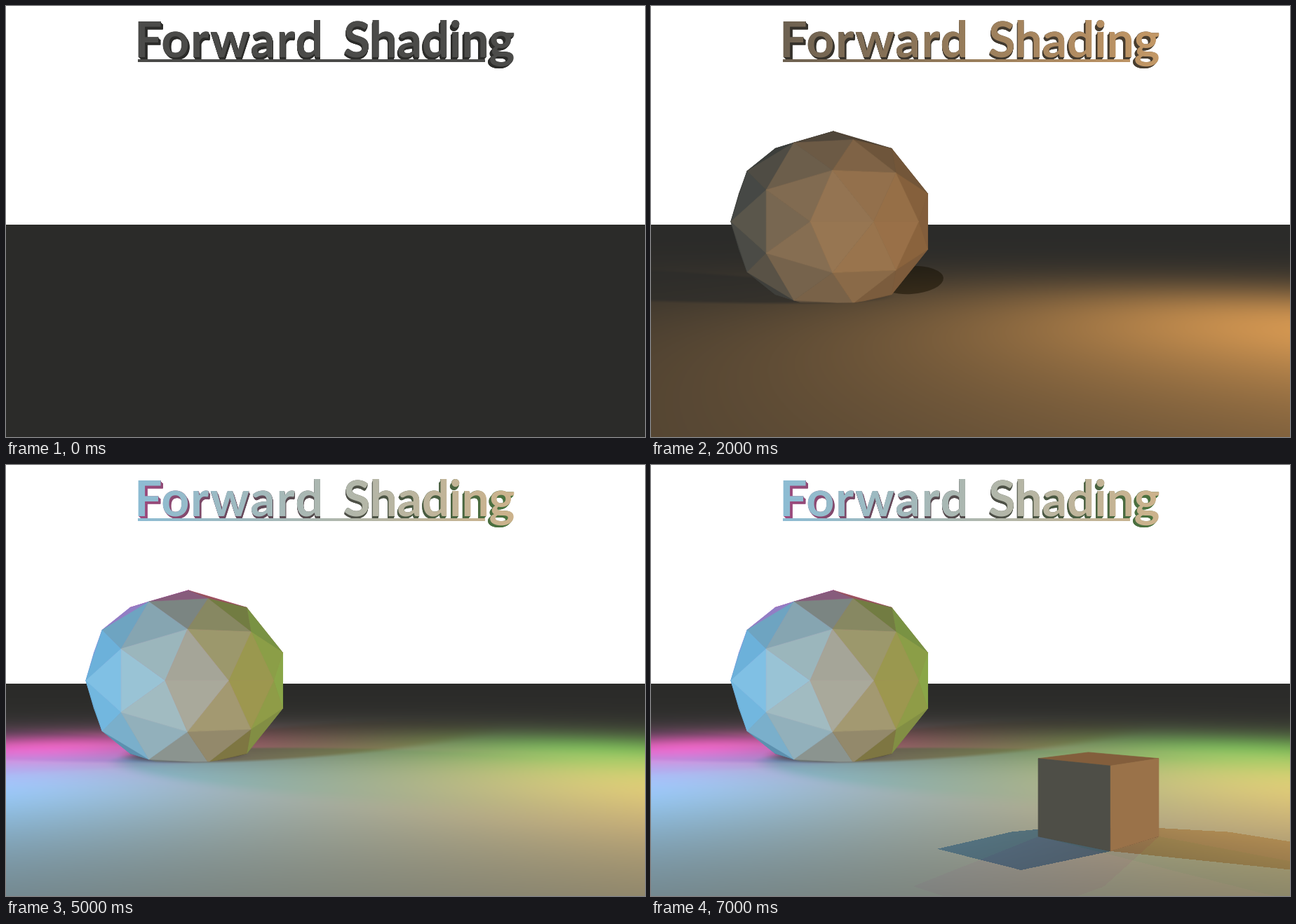
An HTML page with a canvas that plays this animation: 911 px wide and 615 px high, repeating every 8 s.

```html
<!DOCTYPE html>
<html lang="en">
<head>
<meta charset="utf-8">
<title>Forward Shading</title>
<style>
html, body { margin: 0; width: 100%; height: 100%; overflow: hidden; background: #fff; }
canvas { display: block; width: 911px; height: 615px; }
</style>
</head>
<body>
<canvas id="stage" width="911" height="615"></canvas>
<script>
const W = 911, H = 615, HORIZON = 307.5, EDGE = 312, FOCAL = 996;
const STEP = 1000, STEPS = 8;

// World: camera at height 1, x to the right, y up, z away from the viewer.
// Light directions and normals: x to the right, y down, z toward the viewer.
const lights = [
  { x: 3.6, z: 6.13, reach: 4.7, wrap: .15, floor: [172, 110, 41], dir: [.75, .1, .65], tint: [98, 56, 18] },
  { x: -3.6, z: 6.13, reach: 4.5, wrap: .15, floor: [45, 130, 185], dir: [-.8, .05, .58], tint: [40, 112, 160] },
  { x: 4, z: 9.9, reach: 3.7, wrap: 0, floor: [0, 80, 10], dir: [.9, -.1, -.3], tint: [8, 85, 15], back: true },
  { x: -4.2, z: 10.4, reach: 3.2, wrap: 0, floor: [165, 5, 85], dir: [-.25, -.5, -.85], tint: [260, -40, 140], back: true }
];
const LAMP = 3;
const ball = { x: -1.81, z: 9.22, rx: 1.31, ry: 1.19, turn: 58.5 * Math.PI / 180 };
const cube = { x: .82, z: 4.476, reach: .386, height: .5 };

const rgb = c => `rgb(${c.map(v => Math.round(Math.max(0, Math.min(255, v)))).join()})`;
const dot = (a, b) => a[0] * b[0] + a[1] * b[1] + a[2] * b[2];
const dist = (a, b) => Math.hypot(...a.map((v, i) => v - b[i]));
const unit = a => a.map(v => v / Math.hypot(...a));
const sum = (...vs) => vs[0].map((_, i) => vs.reduce((t, v) => t + v[i], 0));
const lightsAt = step => lights.slice(0, Math.max(0, step - 1));
const project = ([x, y, z]) => [W / 2 + FOCAL * x / z, HORIZON + FOCAL * (1 - y) / z];

function poly(g, pts, fill) {
  g.beginPath();
  pts.map(project).forEach(([x, y]) => g.lineTo(x, y));
  g.closePath();
  g.fillStyle = g.strokeStyle = fill;
  g.lineWidth = .7;
  g.fill();
  g.stroke();
}

function shade(n, on) {
  const key = Math.max(0, dot(n, [-.35, 0, .93]));
  const col = [46 + 28 * key, 46 + 31 * key, 44 + 29 * key];
  for (const l of on) {
    const k = Math.max(0, (dot(n, l.dir) + l.wrap) / (1 + l.wrap));
    l.tint.forEach((v, i) => col[i] += v * k);
  }
  return rgb(col);
}

// Share of a lamp's light that gets past the ball to a floor point.
function pastBall(l, x, z) {
  const dx = x - l.x, dz = z - l.z;
  const cx = ball.x - l.x, cy = 1 - LAMP, cz = ball.z - l.z;
  const along = (cx * dx - cy * LAMP + cz * dz) / (dx * dx + LAMP * LAMP + dz * dz);
  const t = Math.min(1, Math.max(0, along));
  const a = cx - t * dx, b = cy + t * LAMP, c = cz - t * dz;
  const miss = Math.sqrt(a * a + b * b + c * c);
  const k = Math.min(1, Math.max(0, (miss / 1.25 - .8) / .25));
  return .3 + .7 * k * k * (3 - 2 * k);
}

// Slab test between a floor point and a lamp; the cube stands turned by 45 degrees.
function behindCube(l, x, z) {
  const px = x - cube.x, pz = z - cube.z, dx = l.x - x, dz = l.z - z;
  let near = 0, far = cube.height / LAMP;
  for (const s of [1, -1]) {
    const p = px + s * pz, d = dx + s * dz;
    const a = (-cube.reach - p) / d, b = (cube.reach - p) / d;
    near = Math.max(near, Math.min(a, b));
    far = Math.min(far, Math.max(a, b));
  }
  return near < far;
}

function drawFloor(g, step) {
  const on = lightsAt(step);
  const img = g.createImageData(W, H - EDGE);
  let i = 0;
  for (let y = EDGE; y < H; y++) {
    const z = FOCAL / (y + .5 - HORIZON);
    for (let px = 0; px < W; px++) {
      const x = (px - W / 2) * z / FOCAL;
      let r = 43, gr = 43, b = 41;
      for (const l of on) {
        const q = 1 + ((x - l.x) ** 2 + (z - l.z) ** 2) / l.reach ** 2;
        let k = pastBall(l, x, z) / (q * Math.sqrt(q));
        if (step > 5 && behindCube(l, x, z)) k *= .15;
        r += k * l.floor[0];
        gr += k * l.floor[1];
        b += k * l.floor[2];
      }
      img.data[i++] = r;
      img.data[i++] = gr;
      img.data[i++] = b;
      img.data[i++] = 255;
    }
  }
  g.putImageData(img, 0, EDGE);
}

function drawContact(g, step) {
  if (step === 1) {
    g.save();
    g.translate(255, 428);
    g.scale(1, .15);
    const glow = g.createRadialGradient(0, 0, 0, 0, 0, 340);
    glow.addColorStop(0, 'rgba(110,108,104,.4)');
    glow.addColorStop(.4, 'rgba(90,88,84,.18)');
    glow.addColorStop(1, 'rgba(80,80,76,0)');
    g.fillStyle = glow;
    g.fillRect(-340, -340, 680, 680);
    g.restore();
  }
  if (step < 4) {
    g.fillStyle = 'rgba(20,14,0,.5)';
    g.beginPath();
    g.ellipse(370, 391, 47, 20, -.06, 0, 7);
    g.fill();
  }
}

// Icosahedron with every face split in four and pushed out to the unit sphere.
function icosphere() {
  const gold = (1 + Math.sqrt(5)) / 2, v = [], faces = [];
  for (const a of [1, -1]) for (const b of [gold, -gold]) {
    v.push(unit([a, b, 0]), unit([0, a, b]), unit([b, 0, a]));
  }
  const joined = (a, b) => dist(a, b) < 1.1;
  v.forEach((a, i) => v.slice(i + 1).forEach((b, j) => v.slice(i + j + 2).forEach(c => {
    if (!joined(a, b) || !joined(b, c) || !joined(a, c)) return;
    const ab = unit(sum(a, b)), bc = unit(sum(b, c)), ca = unit(sum(c, a));
    faces.push([a, ab, ca], [b, ab, bc], [c, bc, ca], [ab, bc, ca]);
  })));
  return faces;
}

// Cuts off what lies below the floor.
function aboveFloor(pts) {
  return pts.flatMap((p, i) => {
    const q = pts[(i + 1) % pts.length], kept = p[1] >= 0 ? [p] : [];
    if (p[1] >= 0 === q[1] >= 0) return kept;
    const t = p[1] / (p[1] - q[1]);
    return [...kept, p.map((v, k) => v + t * (q[k] - v))];
  });
}

function drawBall(g, step) {
  const on = lightsAt(step);
  const c = Math.cos(ball.turn), s = Math.sin(ball.turn);
  const turn = ([u, y, w]) => [u * c - w * s, -y, u * s + w * c];
  const place = ([x, y, z]) => [ball.x + ball.rx * x, 1 - ball.ry * y, ball.z - ball.rx * z];
  icosphere()
    .map(f => f.map(turn))
    .map(f => ({ n: unit(sum(...f)), pts: f.map(place) }))
    .sort((a, b) => sum(...b.pts)[2] - sum(...a.pts)[2])
    .forEach(f => {
      const pts = aboveFloor(f.pts);
      if (pts.length) poly(g, pts, shade(f.n, on));
    });
}

function drawCube(g, on) {
  const { x, z, reach: d, height: h } = cube;
  const corner = (i, y) => [x + d * Math.sin(i * Math.PI / 2), y, z - d * Math.cos(i * Math.PI / 2)];
  const side = (a, b) => [corner(a, 0), corner(b, 0), corner(b, h), corner(a, h)];
  poly(g, [0, 1, 2, 3].map(i => corner(i, h)), shade([.95, 0, .2], on));
  poly(g, side(0, 3), shade([-.7, 0, .7], on));
  poly(g, side(0, 1), shade([.7, 0, .7], on));
}

// Title colours: front lamps light the faces, back lamps the extruded sides.
function titleRamp(g, on, base, front, back) {
  const grad = g.createLinearGradient(188, 0, 723, 0);
  for (let p = 0; p <= 1; p += .25) {
    const col = [base, base, base - 2];
    for (const l of on) {
      const q = l.x > 0 ? p : 1 - p;
      const k = l.back ? back * q ** 3 : front * (.2 + .5 * q);
      l.floor.forEach((v, i) => col[i] += v * k);
    }
    grad.addColorStop(p, rgb(col));
  }
  return grad;
}

function drawTitle(g, step) {
  const on = lightsAt(step);
  const words = () => {
    for (const [text, x, gap] of [['Forward', 183, 1.7], ['Shading', 481, -.4]]) {
      g.letterSpacing = gap + 'px';
      g.fillText(text, x, 73);
    }
  };
  g.font = 'bold 70px Lato, "Open Sans", sans-serif';
  g.fillStyle = titleRamp(g, on, 43, .25, .6);
  for (let k = 8; k > 0; k--) {
    const s = 1 - .0018 * k;
    g.save();
    g.translate(W / 2, HORIZON);
    g.scale(s, s);
    g.translate(-W / 2, -HORIZON);
    words();
    g.restore();
  }
  g.fillStyle = titleRamp(g, on, 75, 1, 0);
  g.fillRect(188, 76, 495, 4);
  words();
}

function render(step) {
  const c = document.createElement('canvas');
  c.width = W;
  c.height = H;
  const g = c.getContext('2d');
  g.fillStyle = '#fff';
  g.fillRect(0, 0, W, H);
  drawFloor(g, step);
  if (step > 0) {
    drawContact(g, step);
    drawBall(g, step);
  }
  if (step > 5) drawCube(g, lights.slice(0, step - 6));
  drawTitle(g, step);
  return c;
}

const scenes = [];
const scene = step => scenes[step] ??= render(step);
const stage = document.getElementById('stage').getContext('2d');
const start = performance.now();
let shown = -1;

function tick() {
  const step = Math.floor((performance.now() - start) / STEP) % STEPS;
  if (step !== shown) {
    stage.drawImage(scene(step), 0, 0);
    shown = step;
  } else if (scenes.length < STEPS) {
    scene(scenes.length);
  }
  requestAnimationFrame(tick);
}
tick();
</script>
</body>
</html>
```
